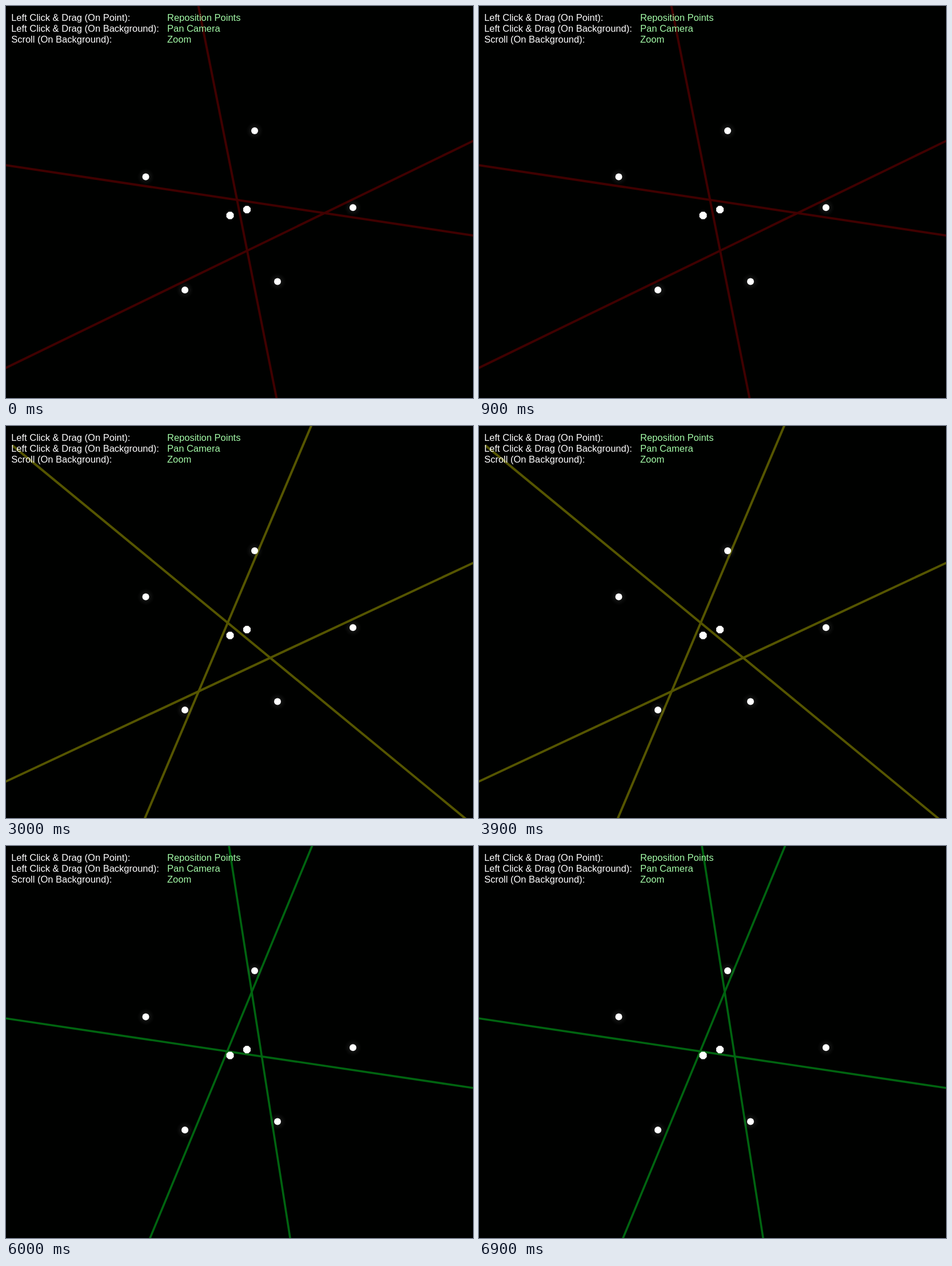
An HTML page for the animation above (7500 ms loop, 817 px wide and 685 px high).

```html
<!DOCTYPE html>
<html lang="en">
<head>
<meta charset="utf-8">
<title>Lines between points</title>
<style>
  html, body { margin: 0; width: 100%; height: 100%; overflow: hidden; background: #000100; }
  svg { display: block; width: 817px; height: 685px; }
  text { font: 16.5px "Liberation Sans", Arial, sans-serif; fill: #fff; }
  .action { fill: #a4fca8; }
</style>
</head>
<body>
<svg id="stage" viewBox="0 0 817 685">
  <defs>
    <radialGradient id="glow">
      <stop offset="0.4" stop-color="#fff" stop-opacity="0.07"/>
      <stop offset="0.75" stop-color="#fff" stop-opacity="0.025"/>
      <stop offset="1" stop-color="#fff" stop-opacity="0"/>
    </radialGradient>
  </defs>
</svg>
<script>
const HOLD = 1500;
const REACH = 488; // how far a triangle side runs on past its corners
const stage = document.getElementById('stage');

// Each scene shows the extended sides of one triangle.
const scenes = [
  { color: '#400000', width: 4, corners: [[404.2, 338.9], [421.9, 427.6], [557.3, 361.9]] },
  { color: '#002224', width: 3.2, corners: [[437.2, 324.7], [380.6, 392.1], [457.6, 454.4]] },
  { color: '#555500', width: 4, corners: [[387.9, 343.9], [337.1, 463.6], [462.3, 405.1]] },
  { color: '#000066', width: 3.6, corners: [[398.6, 385.1], [415.6, 343.2], [331.4, 330.5]] },
  { color: '#006410', width: 3.6, corners: [[429.9, 255.1], [387, 358.8], [447.5, 367.8]] }
];

const outer = [[435, 218], [244.5, 298.5], [607, 352.3], [475, 481.5], [313, 496.3]];
const inner = [[392, 366], [421.5, 355.8]];

const help = [
  ['Left Click & Drag (On Point):', 'Reposition Points'],
  ['Left Click & Drag (On Background):', 'Pan Camera'],
  ['Scroll (On Background):', 'Zoom']
];

function add(parent, tag, attrs, label = '') {
  const el = document.createElementNS('http://www.w3.org/2000/svg', tag);
  for (const key in attrs) el.setAttribute(key, attrs[key]);
  el.textContent = label;
  return parent.appendChild(el);
}

function addSide(parent, [ax, ay], [bx, by]) {
  const k = REACH / Math.hypot(bx - ax, by - ay);
  const dx = (bx - ax) * k, dy = (by - ay) * k;
  add(parent, 'line', { x1: ax - dx, y1: ay - dy, x2: bx + dx, y2: by + dy });
}

function octagon(cx, cy, r) {
  return Array.from({ length: 8 }, (_, i) => {
    const a = (i + 0.5) * Math.PI / 4;
    return [cx + r * Math.cos(a), cy + r * Math.sin(a)];
  }).join(' ');
}

const groups = scenes.map(({ color, width, corners }) => {
  const g = add(stage, 'g', { stroke: color, 'stroke-width': width });
  corners.forEach((corner, i) => addSide(g, corner, corners[(i + 1) % 3]));
  return g;
});

for (const [cx, cy] of outer) {
  add(stage, 'circle', { cx, cy, r: 15, fill: 'url(#glow)' });
  add(stage, 'circle', { cx, cy, r: 6, fill: '#fff' });
}
for (const [cx, cy] of inner) {
  add(stage, 'polygon', { points: octagon(cx, cy, 7), fill: '#fff' });
}

help.forEach(([input, action], i) => {
  const y = 26.3 + i * 18.9;
  add(stage, 'text', { x: 9.2, y }, input);
  add(stage, 'text', { x: 282, y, class: 'action' }, action);
});

const start = performance.now();
function draw(now) {
  const current = Math.floor(Math.max(0, now - start) / HOLD) % scenes.length;
  groups.forEach((g, i) => g.setAttribute('visibility', i === current ? 'visible' : 'hidden'));
  requestAnimationFrame(draw);
}
draw(start);
</script>
</body>
</html>
```
